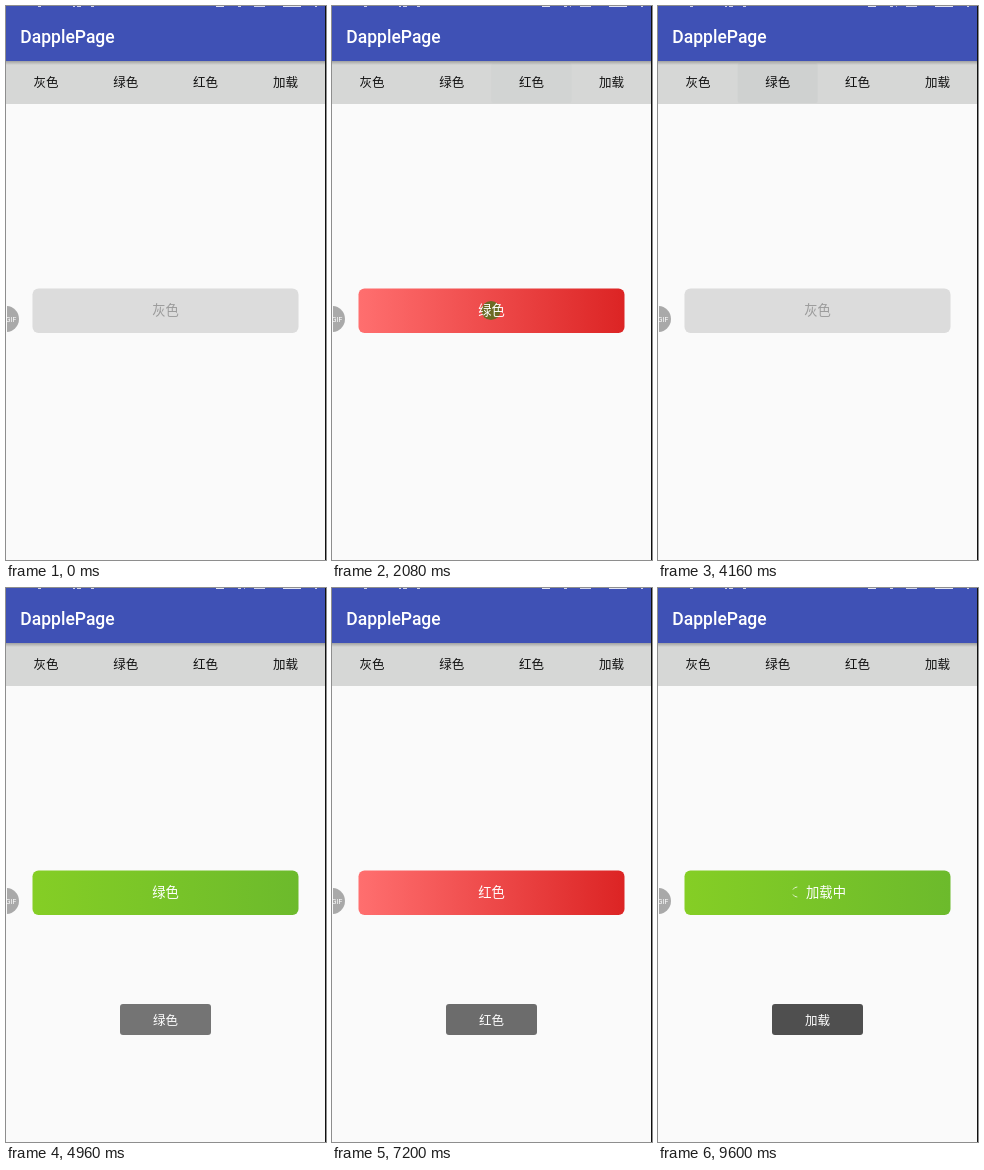
An HTML page for the animation above (9760 ms loop, 320x554 px).

```html
<!DOCTYPE html>
<html lang="zh">
<head>
<meta charset="utf-8">
<title>DapplePage</title>
<style>
  html, body { margin: 0; width: 100%; height: 100%; overflow: hidden; background: #fafafa; }
  svg { display: block; width: 100%; height: 100%; }
  text { font-family: "Noto Sans CJK SC", "Noto Sans CJK", "Noto Sans CJK JP", sans-serif; text-anchor: middle; }
  .bar { font: 500 17.5px Roboto, sans-serif; text-anchor: start; fill: #fff; }
  .tab { font-size: 12.5px; font-weight: 500; fill: #111; }
  .label { font-size: 13.3px; }
  .toast { font-size: 12.5px; font-weight: 500; fill: #fff; }
  .badge { font: 7px Roboto, sans-serif; fill: #fff; }
</style>
</head>
<body>
<svg viewBox="0 0 320 554" preserveAspectRatio="none">
  <defs>
    <linearGradient id="green"><stop stop-color="#85ce25"/><stop offset="1" stop-color="#6cba2c"/></linearGradient>
    <linearGradient id="red"><stop stop-color="#ff6f6f"/><stop offset="1" stop-color="#dc2424"/></linearGradient>
    <linearGradient id="shade" x2="0" y2="1"><stop stop-color="#000" stop-opacity=".25"/><stop offset="1" stop-color="#000" stop-opacity="0"/></linearGradient>
    <clipPath id="pill"><rect x="26.5" y="282.5" width="266" height="44.5" rx="6"/></clipPath>
    <clipPath id="edge"><rect x="1" y="290" width="30" height="50"/></clipPath>
  </defs>
  <rect width="320" height="554" fill="#fafafa"/>
  <rect y="55" width="320" height="43" fill="#d6d7d6"/>
  <rect id="press" y="57" width="80" height="40" rx="2" fill="#c9cccb"/>
  <g id="tabs"></g>
  <rect y="55" width="320" height="4" fill="url(#shade)"/>
  <rect width="320" height="55" fill="#3f51b5"/>
  <path d="M32 .4h3M67 .4h2m2 0h4M85 .4h3M210 .5h8M232 .4h3M248 .4h11M277 .5h18M309 .4h2" stroke="#fff" stroke-opacity=".85"/>
  <rect id="blip" x="238" width="1" height="1" fill="#fff" opacity=".6"/>
  <text class="bar" x="14.3" y="37.3">DapplePage</text>

  <g clip-path="url(#pill)">
    <rect id="fill" x="26" y="282" width="267" height="46"/>
    <circle id="dot" cx="159" cy="304.5"/>
  </g>
  <text id="label" class="label" y="309.4"></text>
  <circle id="spin" cx="139.3" cy="304" fill="none" stroke="#fff" stroke-opacity=".75" pathLength="12" stroke-dasharray="0 3 2 2 2 3"/>

  <g clip-path="url(#edge)">
    <circle cy="313" r="13" fill="#a9a9a9"/>
    <text class="badge" x="5" y="315.5">GIF</text>
  </g>

  <g id="toast">
    <rect x="114" y="416" width="91" height="31" rx="3" fill="#4f4f4f"/>
    <text id="note" class="toast" x="159.5" y="436.8"></text>
  </g>
  <rect x="319" width="1" height="554" fill="#111"/>
</svg>
<script>
const LOOP = 9760, TICK = 160;
const $ = id => document.getElementById(id);
const set = (id, attrs) => {
  for (const k in attrs) $(id).setAttribute(k, attrs[k]);
};

const NAMES = ['灰色', '绿色', '红色', '加载'];
const STYLES = [
  { text: '灰色', fill: '#dcdcdc', ink: '#9b9b9b', dot: '#969696' },
  { text: '绿色', fill: 'url(#green)', ink: '#fff', dot: '#6b6a24' },
  { text: '红色', fill: 'url(#red)', ink: '#fff', dot: '#96452a' },
  { text: '加载中', fill: 'url(#green)', ink: '#fff', dot: '#6b8a2c' }
];
// [time, tab]
const TAPS = [[-1000, 0], [1040, 1], [1760, 2], [2400, 3], [3200, 0], [4160, 1], [5760, 2], [7840, 3]];
// [fade in, fade out, tab]
const TOASTS = [[4800, 6800, 1], [7030, 8880, 2], [9360, LOOP, 3]];
const HOLD = 160, SHRINK = 180, FADE = 205;

const clamp = v => Math.max(0, Math.min(1, v));

NAMES.forEach((name, i) => {
  const el = document.createElementNS('http://www.w3.org/2000/svg', 'text');
  el.setAttribute('class', 'tab');
  el.setAttribute('x', 40 + i * 79.8);
  el.setAttribute('y', 81.2);
  el.textContent = name;
  $('tabs').append(el);
});

function drawButton(t) {
  const n = TAPS.findLastIndex(tap => tap[0] <= t);
  const [start, tab] = TAPS[n];
  const age = t - start;
  const now = STYLES[tab];
  const old = n ? STYLES[TAPS[n - 1][1]] : now;

  const glow = age <= HOLD ? 0.5 + age / 320 : 1 - (age - HOLD) / 240;
  set('press', { x: tab * 79.7, opacity: clamp(glow) });

  // The old fill collapses into the centre; its label stays until the end.
  const left = clamp(1 - (age - HOLD) / SHRINK);
  const waiting = age <= HOLD;
  set('fill', { fill: (waiting ? old : now).fill });
  set('dot', { r: waiting ? 0 : 150 * left ** 1.25, fill: old.dot });

  const shown = left > 0 ? old : now;
  const loading = shown === STYLES[3];
  set('label', { x: loading ? 168 : 159.5, fill: shown.ink });
  $('label').textContent = shown.text;

  const spinAge = t - (shown === now ? start : TAPS[n - 1][0]);
  set('spin', {
    opacity: loading ? 1 : 0,
    r: 0.8 + 4.2 * Math.abs(Math.sin(Math.PI * spinAge / 320)),
    transform: `rotate(${360 * spinAge / 1760} 139.3 304)`
  });
}

function drawToast(t) {
  const cur = TOASTS.find(([from, to]) => t >= from && t < to + FADE);
  if (cur) $('note').textContent = NAMES[cur[2]];
  const alpha = cur ? clamp((t - cur[0]) / FADE) * clamp(1 - (t - cur[1]) / FADE) : 0;
  set('toast', { opacity: alpha });
}

function render(ms) {
  const t = Math.floor((ms % LOOP) / TICK) * TICK;
  drawButton(t);
  drawToast(t);
  set('blip', { opacity: t >= 480 && t < 5440 ? 0.6 : 0 });
}

const origin = performance.now();
function loop() {
  render(performance.now() - origin);
  requestAnimationFrame(loop);
}
loop();
</script>
</body>
</html>
```
